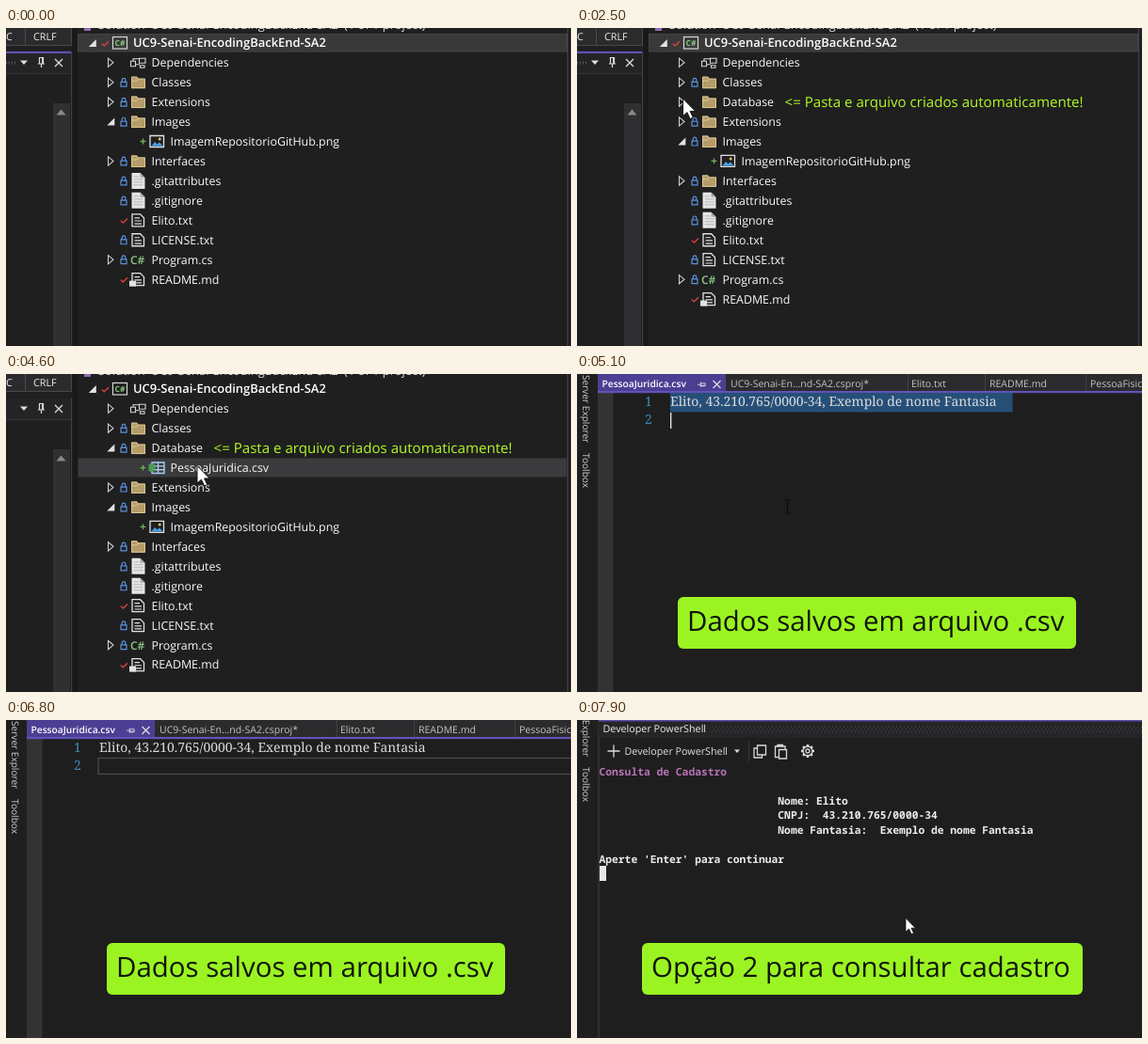
An HTML page that plays this animation: 600 by 338 pixels, repeating every 8 s.

```html
<!DOCTYPE html>
<html lang="pt">
<head>
<meta charset="utf-8">
<style>
  html, body { margin: 0; width: 100%; height: 100%; overflow: hidden; background: #1f1f1f; }
  svg { display: block; width: 100vw; height: 100vh; }
  text { font-family: "Open Sans", "Noto Sans", sans-serif; white-space: pre; text-rendering: geometricPrecision; }
  .code { font-family: "Noto Serif", serif; }
  .mono { font-family: "Noto Sans Mono", monospace; font-weight: 600; }
</style>
</head>
<body>
<svg id="stage" viewBox="0 0 600 338"></svg>
<script>
const LOOP = 8000;
const TIMES = { folder: 800, note: 1700, enter: 2200, expand: 2800, select: 4400, editor: 5000, deselect: 6200, terminal: 7150 };
const PERSON = 'Elito', COMPANY_ID = '43.210.765/0000-34';
const PROJECT = 'UC9-Senai-EncodingBackEnd-SA2';
const stage = document.getElementById('stage');

// Drawing helpers
const rect = (x, y, w, h, fill, extra = '') =>
  `<rect x="${x}" y="${y}" width="${w}" height="${h}" fill="${fill}" ${extra}/>`;
const text = (x, y, size, fill, str, extra = '') =>
  `<text x="${x}" y="${y}" font-size="${size}" fill="${fill}" ${extra}>${str.replace(/</g, '&lt;')}</text>`;
const fillPath = (d, fill) => `<path d="${d}" fill="${fill}"/>`;
const line = (d, color, width = 1.2, extra = '') =>
  `<path d="${d}" fill="none" stroke="${color}" stroke-width="${width}" ${extra}/>`;
const at = (x, y, body, scale = 1) =>
  `<g transform="translate(${x} ${y}) scale(${scale})">${body}</g>`;

const pin = line('M0 3V-3.5H4V3M-1.5 3H5.5M2 3V7M3.2 -3V3', '#ddd');
const cross = line('M-4 -4L4 4M-4 4L4 -4', '#ddd', 1.3);
const mouse = (x, y, scale) => at(x, y,
  '<path d="M0 0V15.5L3.7 12.2L6.4 18L9 16.8L6.3 11.2H11Z" fill="#fff" stroke="#111" stroke-width=".8"/>', scale);

// Tree icons, centred vertically on their row
const marks = {
  lock: line('M123.2 -.5V-2.5a1.8 1.8 0 0 1 3.6 0V-.5M122 -.3H128V4.5H122Z', '#5a92e0', 1.2),
  check: line('M121.8 .5L124.4 2.8L129 -1.8', '#d8433c', 1.4),
  plus: line('M142.6 0H148.4M145.5 -2.9V2.9', '#74b356', 1.3)
};
const page = line('M134 -6.5H142.5L146.5 -2.5V6.5H134Z', '#e2e2e2', 1.3) +
  line('M136.5 -2.5H142M136.5 .7H144M136.5 3.8H144', '#e2e2e2');
const icons = {
  deps: line('M132.5 -1.5H137.5V4H132.5ZM141.5 -4.5H148V.5H141.5ZM142.5 3H147V5.5H142.5ZM135 -2V-4H141M138 2H142', '#d8d8d8', 1.1),
  folder: fillPath('M133 -6H139L140.5 -4H148V6.5H133Z', '#b59c68') +
    line('M133.5 6V-5.5H139L140.5 -3.5H147.5V6ZM133.5 -1.5H139L140.5 -3.5', '#dcc896', 1),
  sheet: fillPath('M133.5 -8.5H142.5L147.5 -3.5V8.5H133.5Z', '#e6e6e6') + fillPath('M142.5 -8.5V-3.5H147.5Z', '#aaa') +
    line('M135.5 -4.5H141M135.5 -1.5H145.5M135.5 1.5H145.5M135.5 4.5H145.5', '#b4b4b4', 1),
  page,
  readme: page + rect(131, 1.5, 7, 6, '#e2e2e2'),
  csharp: text(132, 4.4, 12, '#8fc98a', 'C#', 'font-weight="600"'),
  image: line('M153 -6H167.5V6H153Z', '#e2e2e2', 1.3) + fillPath('M154.5 5L158 .5L160.5 3L163 1L166.5 5Z', '#4aa3e8') +
    '<circle cx="163.2" cy="-2.5" r="1.5" fill="#e6c15c"/>',
  table: line('M155 -5.5H168V6H155ZM155 -1.7H168M155 2.2H168M161.5 -5.5V6', '#a9cdf0', 1.4) + rect(151.5, -4, 7, 8, '#4f9a5a')
};
const arrow = {
  closed: line('M108.5 -4.6L114 0L108.5 4.6Z', '#d0d0d0', 1.1),
  open: fillPath('M115.3 -4V4H107.3Z', '#e2e2e2')
};

function treeRows(t) {
  const rows = [
    ['Dependencies', 'deps', '', 'closed'],
    ['Classes', 'folder', 'lock', 'closed'],
    ['Extensions', 'folder', 'lock', 'closed'],
    ['Images', 'folder', 'lock', 'open'],
    ['ImagemRepositorioGitHub.png', 'image', 'plus'],
    ['Interfaces', 'folder', 'lock', 'closed'],
    ['.gitattributes', 'sheet', 'lock'],
    ['.gitignore', 'sheet', 'lock'],
    [PERSON + '.txt', 'page', 'check'],
    ['LICENSE.txt', 'page', 'lock'],
    ['Program.cs', 'csharp', 'lock', 'closed'],
    ['README.md', 'readme', 'check']
  ];
  const expanded = t >= TIMES.expand;
  if (t >= TIMES.folder) rows.splice(2, 0, ['Database', 'folder', expanded ? 'lock' : '', expanded ? 'open' : 'closed']);
  if (expanded) rows.splice(3, 0, ['PessoaJuridica.csv', 'table', 'plus']);
  return rows.map(([name, icon, mark, state], i) => at(0, 36.7 + i * 20.95,
    (arrow[state] || '') + (marks[mark] || '') + icons[icon] +
    text(mark === 'plus' ? 174.5 : 154.5, 4.4, 12.4, '#fafafa', name, 'font-weight="500"'))).join('');
}

function leftPanel(active) {
  return rect(0, 0, 70, 338, '#1f1f1f') + rect(0, 0, 70, 19, '#2b2b2d') +
    line('M20.5 0V19M69.5 0V19M0 18.5H70', '#48484a', 1) +
    text(0, 13.3, 10.8, '#eee', 'C', 'font-weight="500"') + text(29, 13.3, 10.8, '#eee', 'CRLF', 'font-weight="500"') +
    rect(0, 26, 69, 22, '#242426') + (active ? rect(0, 24.8, 69.5, 2.2, '#5f51b4') : '') +
    fillPath('M15 34.5H23L19 39Z', '#ddd') + at(35.5, 35, pin) + at(56, 37, cross) +
    (active ? line('M0 37H10', '#58585a', 3, 'stroke-dasharray="1 2"') : '') +
    line('M0 48.5H69', '#353537', 1) + rect(50, 80, 18, 258, '#303032') +
    fillPath('M53.5 92.5L58.5 86.5L63.5 92.5Z', '#8a8a8a') +
    rect(69, 25, 1.3, 313, '#414143') + rect(70.5, 0, 5.5, 338, '#19191a');
}

function cursorOnTree(t) {
  if (t < TIMES.enter) return '';
  const ease = (from, to) => {
    const p = Math.min(1, Math.max(0, (t - from) / (to - from)));
    return p * p * (3 - 2 * p);
  };
  const into = ease(TIMES.enter, 2480), toFile = ease(3100, 3700);
  return mouse(-12 + 124.5 * into + 90.5 * toFile, 130 - 55 * into + 22.5 * toFile, 1.2);
}

function explorer(t) {
  const expanded = t >= TIMES.expand, selected = t >= TIMES.select;
  const highlight = selected ? rect(76.5, 89.5, 519, 20, '#3b3b3e')
    : rect(76.5, 6.5, 519, 18.5, '#39393a', `stroke="${expanded ? '#98989c' : '#444446'}"`);
  return rect(0, 0, 600, 338, '#1f1f1f') + leftPanel(!expanded) + rect(595.8, 0, 1.3, 338, '#414143') +
    rect(83, 0, 7, 3, '#8d6bb5') + text(98, 1.3, 12.9, '#ddd', `Solution '${PROJECT}' (1 of 1 project)`) + highlight +
    at(-19.5, 16, arrow.open) + at(-20, 16, marks.check) +
    rect(113.5, 9.5, 15, 12.5, 'none', 'stroke="#d8d8d8" stroke-width="1.2"') +
    text(115.5, 19, 8.5, '#83c97d', 'C#', 'font-weight="700"') +
    text(135, 20.2, 12.95, '#fff', PROJECT, 'font-weight="600"') + treeRows(t) +
    (t >= TIMES.note ? text(220.5, 84.3, 15.1, '#b2fa26', '<= Pasta e arquivo criados automaticamente!') : '') +
    cursorOnTree(t);
}

const sidebar = shift => rect(0, 0, 22, 338, '#1f1f1f') +
  [['Server Explorer', 1], ['Toolbox', 84]].map(([label, y]) =>
    text(0, 0, 10.1, '#cfcfcf', label, `transform="translate(5.5 ${y + shift}) rotate(90)"`)).join('');

const banner = (x, width, label) =>
  rect(x, 237, width, 55, '#9bf422', 'rx="6"') + text(x + 10, 272.5, 29.4, '#10150a', label);

function editor(t) {
  const marked = t < TIMES.deselect;
  const code = (x, y, fill, str) => text(x, y, 13.9, fill, str, 'class="code"');
  const tabs = [[163, 'UC9-Senai-En...nd-SA2.csproj*'], [355, PERSON + '.txt'], [438, 'README.md'], [545, 'PessoaFisica.csv']];
  return rect(0, 0, 600, 338, '#1e1e1e') + sidebar(0) + rect(22, 20, 16.5, 318, '#333334') +
    rect(22, 0, 578, 19, '#2b2b2d') + rect(22, 0, 136, 19, '#4b3f93') + rect(22, 18, 578, 2.2, '#6253b8') +
    line('M351.5 0V18M433.5 0V18M540.5 0V18', '#414144', 1) +
    text(26.5, 14, 10.2, '#fff', 'PessoaJuridica.csv', 'font-weight="600"') +
    at(133.5, 9.8, `<g transform="rotate(90) scale(.75)">${pin}</g>`) + at(148.5, 11, cross) +
    tabs.map(([x, label]) => text(x, 14, 10.5, '#c4c4c4', label)).join('') +
    (marked ? rect(99, 20, 363.5, 20.5, '#264f78') + rect(99, 41, 1.3, 17, '#eee')
      : rect(98, 40.5, 505, 17, 'none', 'stroke="#4a4a4a" stroke-width="1.3"')) +
    code(72, 33.5, '#3b8db5', '1') + code(72, 53, '#3b8db5', '2') +
    code(99, 33.5, '#dcdcdc', `${PERSON}, ${COMPANY_ID}, Exemplo de nome Fantasia`) +
    (marked ? line('M220.5 134H226.5M223.5 134V148M220.5 148H226.5', '#0c0c0c') : '') +
    banner(107, 423, 'Dados salvos em arquivo .csv');
}

function gear() {
  const teeth = Array.from({ length: 8 }, (_, i) =>
    `<path d="M0 -4.5V-7" transform="rotate(${i * 45})" stroke="#d8d8d8" stroke-width="2.4"/>`).join('');
  return teeth + '<g fill="none" stroke="#d8d8d8" stroke-width="1.3"><circle r="5"/><circle r="2"/></g>';
}

function terminal() {
  const lines = [
    [0, 0, 'Consulta de Cadastro', '#b873b6'],
    [28, 2, 'Nome: ' + PERSON],
    [28, 3, 'CNPJ:  ' + COMPANY_ID],
    [28, 4, 'Nome Fantasia:  Exemplo de nome Fantasia'],
    [0, 6, "Aperte 'Enter' para continuar"]
  ];
  return rect(0, 0, 600, 338, '#1e1e1e') + sidebar(-34) + rect(22.5, 0, 1.2, 338, '#3c3c3e') +
    rect(23, 0, 577, 19, '#252527') + rect(23, 0, 577, 1.5, '#5a4ca6') +
    text(27.5, 13, 10.75, '#eee', 'Developer PowerShell') +
    line('M143 7.5H600M145 10H600M143 12.5H600', '#4c4c4e', 1, 'stroke-dasharray="1 3"') +
    line('M32.5 33H45.5M39 26.5V39.5', '#ddd', 1.3) +
    text(50.5, 37, 10.75, '#e2e2e2', 'Developer PowerShell') + fillPath('M167 31.5H173L170 35Z', '#ddd') +
    line('M182.5 22V44', '#3b3b3d', 1) +
    line('M191.5 27H200.5V37H191.5ZM191 30H188V40H196.5V37.5', '#d8d8d8', 1.3) +
    line('M214 39.5H210.5V28H221V31M213 29V26.5H218.5V29M214.5 31.5H222.5V41H214.5Z', '#d8d8d8', 1.3) +
    at(245, 33, gear()) +
    lines.map(([col, row, str, fill = '#ececec']) =>
      text(23.5 + col * 6.78, 58.5 + row * 15.5, 11.3, fill, str, 'class="mono"')).join('') +
    rect(24, 155, 7, 16, '#e6e6e6') +
    banner(69, 468, 'Opção 2 para consultar cadastro') + mouse(349, 210.5, .95);
}

const start = performance.now();
let shown = '';
function draw() {
  const t = (performance.now() - start) % LOOP;
  const markup = t < TIMES.editor ? explorer(t) : t < TIMES.terminal ? editor(t) : terminal();
  if (markup !== shown) stage.innerHTML = shown = markup;
  requestAnimationFrame(draw);
}
draw();
</script>
</body>
</html>
```
